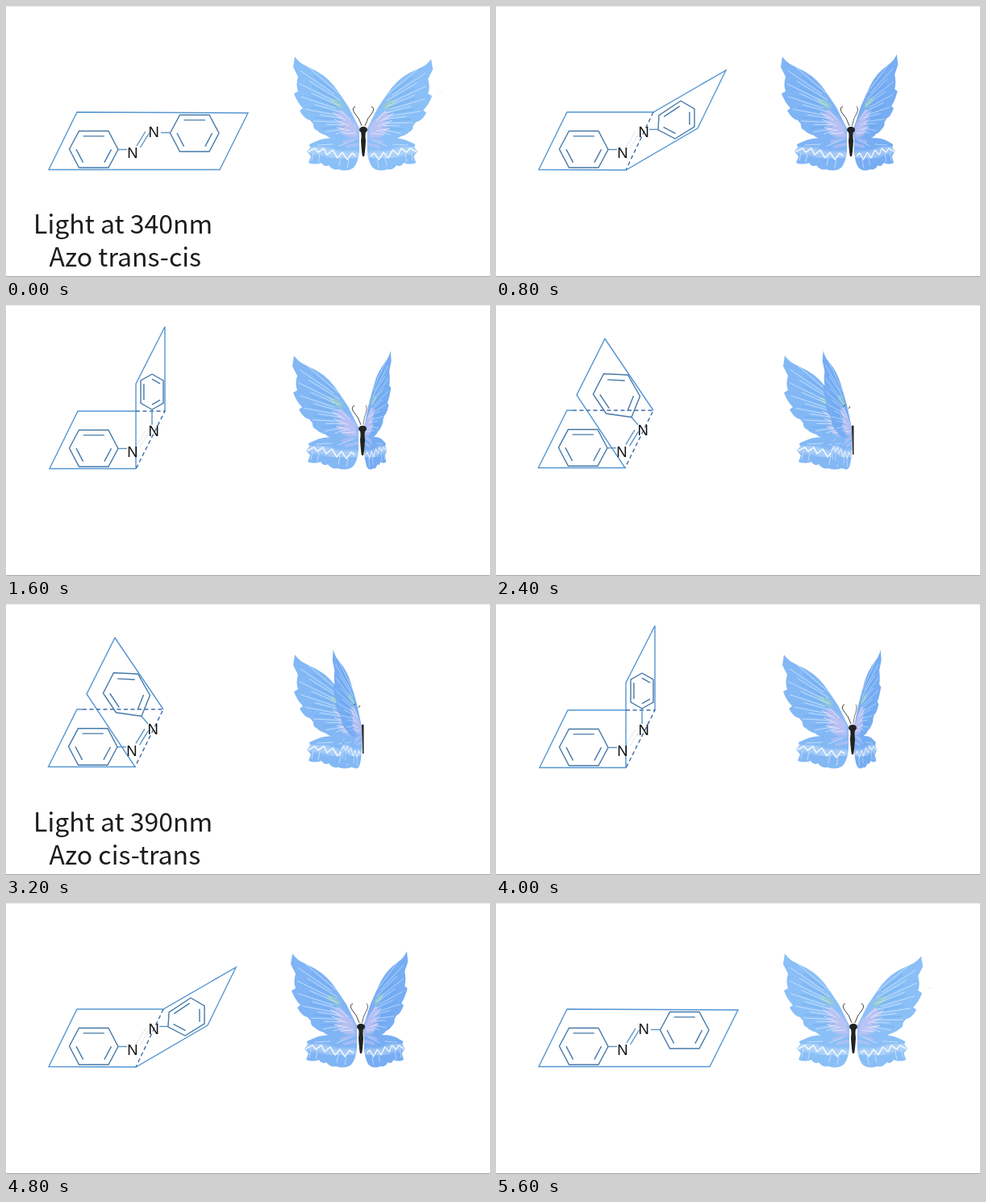
Recreate the animation shown at these times as an HTML page. Size 600 by 337 pixels, loop 6400 ms.

```html
<!DOCTYPE html>
<html lang="en">
<head>
<meta charset="utf-8">
<title>Azo butterfly</title>
<style>
html, body { margin: 0; width: 100%; height: 100%; overflow: hidden; background: #fff; }
svg { display: block; width: 100%; height: 100%; }
.caption { font: 32px "Noto Sans CJK SC", "Noto Sans CJK JP", "Noto Sans", sans-serif; fill: #1c1c1c; }
.atom { font: 18.5px "Liberation Sans", Arial, sans-serif; fill: #111; }
.sheet, .ring, .bond, .fold, .faint { fill: none; stroke-width: 1.4; }
.sheet { stroke: #5596d3; }
.ring { stroke: #467aa9; }
.bond { stroke: #5b94c4; }
.fold { stroke: #3f6ea8; stroke-dasharray: 5 3.5; }
.faint { stroke: #c3cbd8; stroke-width: 1; stroke-dasharray: 1.5 1.5; }
.feeler { fill: none; stroke: #444; stroke-width: 1; }
</style>
</head>
<body>
<svg id="stage" viewBox="0 0 600 337" preserveAspectRatio="none">
  <defs>
    <filter id="soft" x="-30%" y="-30%" width="160%" height="160%"><feGaussianBlur stdDeviation="1.6"/></filter>
    <path id="upperShape" d="M-85-87Q-79-79-72-76L-58-69Q-49-64-42-57Q-36-51-30-42L-18-24L-10-8L-5 2V14L-30 17Q-42 15-46 11Q-55 8-57 5Q-63 2-62-3L-66-8Q-73-9-79-20L-75-23Q-82-30-86-41L-81-44Q-84-52-81-62Q-84-68-87-74Z"/>
    <path id="lowerShape" d="M-5 8Q-20 13-33 14Q-50 14-58 18L-67 22L-66 26L-70 31L-65 37L-68 45Q-60 48-52 45Q-48 51-43 48Q-38 55-31 53Q-20 57-12 51Q-6 44-5 30Z"/>
    <clipPath id="upperClip"><use href="#upperShape"/></clipPath>
    <clipPath id="lowerClip"><use href="#lowerShape"/></clipPath>
    <g id="upper">
      <use href="#upperShape" fill="currentColor"/>
      <g clip-path="url(#upperClip)">
        <g filter="url(#soft)">
          <path d="M-36-18L-26-20L-8-2L-6 14L-20 13L-31 3L-29-6Z" fill="#c9c4f3" opacity=".75"/>
          <ellipse cx="-33" cy="-29" rx="10" ry="4" transform="rotate(35 -33 -29)" fill="#98cfc9" opacity=".8"/>
        </g>
        <g id="veins" fill="none" stroke-linecap="round"></g>
        <path d="M-38-18L-22-8M-36-9L-18-1M-33 1L-16 5M-28-20L-16-8M-26 9L-10 8" stroke="#f1effc" opacity=".75" fill="none"/>
      </g>
    </g>
    <g id="lower">
      <use href="#lowerShape" fill="currentColor"/>
      <g clip-path="url(#lowerClip)" fill="none" stroke="#fff" stroke-linecap="round" stroke-linejoin="round">
        <path d="M-68 28L-50 30L-32 36L-10 36" stroke-width="11" opacity=".3" filter="url(#soft)"/>
        <path d="M-68 31L-60 27L-56 32L-49 27L-45 35L-38 29L-32 39L-26 32L-20 41L-14 33L-10 36" stroke-width="1.6" opacity=".85"/>
        <path d="M-62 33L-64 42M-54 34L-56 44M-28 38L-30 48M-18 41L-20 51M-57 23L-38 22M-30 24L-12 17" opacity=".5"/>
        <path d="M-24 19L-8 14M-20 25L-7 22" stroke="#c9c4f3" stroke-width="4" opacity=".5"/>
      </g>
    </g>
    <g id="body" fill="#222">
      <ellipse cx="443" cy="154" rx="5" ry="4"/>
      <path d="M440 154Q441 162 440 168Q441 184 442 187H444Q445 184 446 168Q445 162 446 154Z"/>
    </g>
  </defs>
  <rect width="600" height="337" fill="#fff"/>
  <path d="M0 .5H600" stroke="#ebebeb"/>
  <path d="M0 336.5H600" stroke="#a3a3a3"/>
  <g id="poses"></g>
  <g id="captions"></g>
</svg>
<script>
const $ = id => document.getElementById(id);
const line = (cls, d) => `<path class="${cls}" d="${d}"/>`;
const atom = (x, y) => `<text class="atom" x="${x}" y="${y}">N</text>`;

// Streaks fanning from the wing root to its outer edge
function veins(n) {
  let out = '';
  for (let i = 0; i < n; i++) {
    const t = i / (n - 1), u = 1 - t, j = Math.sin(i * 12.9) * 2;
    const x0 = -24 + 8 * t, y0 = -36 + 40 * t;
    const x1 = -80 * u * u - 196 * u * t - 44 * t * t + j;
    const y1 = -84 * u * u - 60 * u * t + 12 * t * t;
    const a = 0.1 + 0.14 * Math.abs(Math.sin(i * 7.3)), b = 0.78 + 0.16 * Math.sin(i * 4.1);
    const at = k => `${(x0 + (x1 - x0) * k).toFixed(1)} ${(y0 + (y1 - y0) * k).toFixed(1)}`;
    const white = i % 3 !== 1;
    out += `<path d="M${at(a)}L${at(b)}" stroke="${white ? '#e6f2ff' : '#5f9de6'}" ` +
      `stroke-width="${white ? 0.9 : 1.6}" opacity="${white ? 0.7 : 0.35}"/>`;
  }
  return out;
}
$('veins').innerHTML = veins(19);

// Six corners from the bonded side on; inner strokes on alternate sides
function ring(...pts) {
  const mid = k => pts.reduce((sum, p) => sum + p[k], 0) / 6;
  const cx = mid(0), cy = mid(1);
  const inner = pts.map(([x, y]) => [cx + (x - cx) * 0.72, cy + (y - cy) * 0.72]);
  const sides = [1, 3, 5].map(i => `M${inner[i]}L${inner[(i + 1) % 6]}`).join('');
  return line('ring', `M${pts.join('L')}Z`) + line('ring', sides);
}

const leftRing =
  ring([78.5, 178], [90.5, 155.5], [127, 155.5], [139, 178.5], [127, 201], [90.5, 201]) +
  line('bond', 'M139 178.5H150') + atom(150.3, 189.3);
const nn = line('bond', 'M162 174L173 156M166.5 176L177.5 158');
const nnFaint = line('faint', 'M162 174L173 156M166.5 176L177.5 158');
const farAtom = atom(176.6, 163);

const molecules = [
  line('sheet', 'M88 132L300 133L265 203.5H53Z') + leftRing + nn + farAtom +
  line('bond', 'M192 157.5H204') +
  ring([203.5, 158], [215.5, 135.5], [252, 135.5], [264, 158], [252, 181], [215.5, 181]),

  line('sheet', 'M195 132H88L53 203.5L161 204L250 152L285 80Z') +
  line('fold', 'M195 132L161 204') + leftRing + nnFaint + farAtom +
  line('bond', 'M190 153.5H201') +
  ring([201, 154], [202, 136], [229, 118], [246, 128], [246, 150], [222, 165]),

  line('sheet', 'M161 132H89L54 203.5H161V98L197 27V132') +
  line('fold', 'M161 132H197L161 204') + leftRing + nnFaint + farAtom +
  line('bond', 'M181 130V149') +
  ring([181, 130], [167, 122], [167, 94], [181, 86], [195, 94], [195, 122]),

  line('sheet', 'M95 131H88L52.5 202.5H160L100 112L135 42L195 131') +
  line('fold', 'M95 131H195L160 202.5') +
  `<g transform="translate(-1 -.7)">${leftRing}${nn}${farAtom}</g>` +
  line('bond', 'M168 139.5L176 149') +
  ring([168, 139.5], [136.5, 135], [120.5, 111], [133.5, 85.5], [163.5, 87], [178.5, 113.5])
];

const wing = (kind, x, a, b, color) =>
  `<use href="#${kind}" transform="matrix(${a} ${b} 0 1 ${x} 150)" color="${color}"/>`;
const feeler = side => `<g transform="matrix(${side} 0 0 1 ${443 - 443 * side} 0)">` +
  line('feeler', 'M441 149Q438 139 432 133Q428 127 433 125') + '</g>';

// x: body shift, up / low: far wing widths, tilt: far wing shear
function butterfly({ x, up, low, tilt, near, far }) {
  const c = 443 + x;
  return wing('lower', c, 1, 0, near) + wing('upper', c, 1, 0, near) +
    wing('lower', c, low, 0, far) + wing('upper', c, up, tilt, far) +
    `<g transform="translate(${x} 0)">${feeler(1)}${feeler(up)}<use href="#body"/></g>`;
}

const insects = [
  butterfly({ x: 0, up: -0.99, low: -0.96, tilt: -0.035, near: '#8abff7', far: '#8abff7' }) +
    '<path d="M536 106H541" stroke="#eee"/>',
  butterfly({ x: -3, up: -0.67, low: -0.78, tilt: 0.035, near: '#7fb4f5', far: '#77adf3' }),
  butterfly({ x: -1, up: -0.41, low: -0.43, tilt: 0.07, near: '#83b8f5', far: '#76adf3' }),
  wing('lower', 443, 1, 0, '#83b8f5') + wing('upper', 443, 1, 0, '#83b8f5') +
    wing('lower', 443, 0.4, 0, '#83b8f5') + wing('upper', 443, 0.44, 0.07, '#76adf3') +
    line('feeler', 'M431 126L433 124M437 129L439 126') +
    '<path d="M441 150H443.5V186H442Z" fill="#222"/>'
];

$('poses').innerHTML = molecules.map((m, i) => `<g>${m}${insects[i]}</g>`).join('');
$('captions').innerHTML = [['340nm', 'trans-cis'], ['390nm', 'cis-trans']].map(([nm, way]) =>
  `<g class="caption"><text x="34" y="283">Light at ${nm}</text><text x="53.5" y="324">Azo ${way}</text></g>`).join('');

// Each step: pose, then caption if any
const STEP = 800;
const steps = [[0, 0], [1], [2], [3], [3, 1], [2], [1], [0]];
const poses = [...$('poses').children], captions = [...$('captions').children];
const only = (list, k) => list.forEach((g, i) => g.setAttribute('display', i === k ? 'inline' : 'none'));

let shown = -1;
function show(now) {
  const k = Math.floor(Math.max(0, now - start) / STEP) % steps.length;
  if (k !== shown) {
    only(poses, steps[k][0]);
    only(captions, steps[k][1]);
    shown = k;
  }
  requestAnimationFrame(show);
}
const start = performance.now();
show(start);
</script>
</body>
</html>
```
